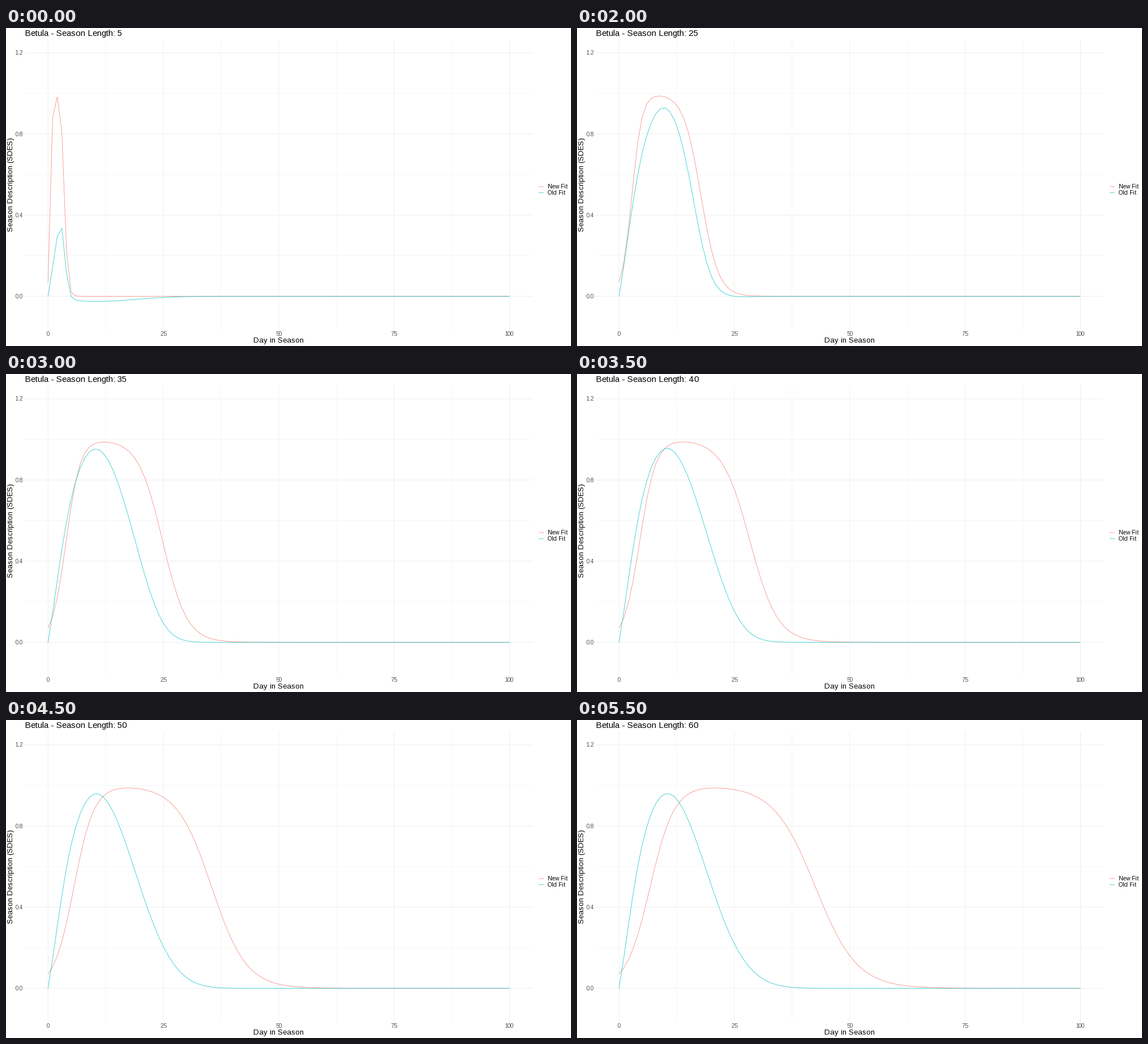
A matplotlib script that plays this animation: 998x561 px, repeating every 6000 ms.

```python
import matplotlib.pyplot as plt
import numpy as np
from matplotlib.animation import FuncAnimation

WIDTH, HEIGHT, DPI = 998, 561, 64
LEFT, RIGHT, TOP, BOTTOM = 33.2, 930.0, 20.4, 532.2
RED, TEAL = "#F8766D", "#00BFC4"
LINE = dict(alpha=0.8, solid_capstyle="butt", solid_joinstyle="round")
LINE_WIDTH = 0.85
DAYS = np.arange(101)

# Whole-pixel glyph advances
plt.rcParams.update({
    "font.family": "Liberation Sans",
    "text.hinting": "force_autohint",
    "text.hinting_factor": 1,
})


def pt(px):
    return px * 72 / DPI


def px_x(day):
    return 74.2 + 8.152 * day


def px_y(value):
    return 473.3 - 357.9 * value


def logistic(z):
    return 1 / (1 + np.exp(-z))


def new_fit(length):
    u = DAYS / length
    return logistic(23 * (u - 0.1125)) * logistic(13.3 * (0.709 - u))


def old_fit(length):
    season = 0.97 * np.tanh(0.27 * DAYS) * np.exp(-(DAYS - 10.25) ** 2 / 150.5)
    end = logistic(11.7 * (0.689 - DAYS / length))
    floor = logistic(11.7 * (0.689 - 1))
    return season * (end - floor) / (1 - floor)


fig = plt.figure(figsize=(WIDTH / DPI, HEIGHT / DPI), dpi=DPI, facecolor="white")
ax = fig.add_axes([0, 0, 1, 1])
ax.set_xlim(0, WIDTH)
ax.set_ylim(HEIGHT, 0)
ax.axis("off")


def stroke(xs, ys, color, width, **style):
    return ax.plot(xs, ys, color=color, lw=pt(width), snap=False, **style)[0]


def label(x, y, text, size, color="black", **style):
    return ax.text(x, y, text, fontsize=pt(size), color=color, va="baseline", **style)


def grid(days, values, width):
    for day in days:
        stroke([px_x(day)] * 2, [TOP, BOTTOM], "#EBEBEB", width)
    for value in values:
        stroke([LEFT, RIGHT], [px_y(value)] * 2, "#EBEBEB", width)


grid((12.5, 37.5, 62.5, 87.5), (0.2, 0.6, 1.0), 0.4)
grid((0, 25, 50, 75, 100), (0, 0.4, 0.8, 1.2), 0.8)

for day in (0, 25, 50, 75, 100):
    label(px_x(day), 543, str(day), 10, "#4D4D4D", ha="center")
for value in (0, 0.4, 0.8, 1.2):
    label(30.2, px_y(value) + 3.6, f"{value:.1f}", 10, "#4D4D4D", ha="right")

label(481.6, 555.5, "Day in Season", 12.5, ha="center")
label(12.2, 276.4, "Season Description (SDES)", 12.5, ha="center",
      rotation=90, rotation_mode="anchor")

for y, name, color in ((279.9, "New Fit", RED), (290.7, "Old Fit", TEAL)):
    stroke([941, 950], [y, y], color, LINE_WIDTH, **LINE)
    label(956.6, y + 3.4, name, 10)

title = label(LEFT, 14, "", 15)
new_line = stroke([], [], RED, LINE_WIDTH, **LINE)
old_line = stroke([], [], TEAL, LINE_WIDTH, **LINE)


def update(frame):
    length = 5 * (frame + 1)
    title.set_text(f"Betula - Season Length: {length}")
    new_line.set_data(px_x(DAYS), px_y(new_fit(length)))
    old_line.set_data(px_x(DAYS), px_y(old_fit(length)))
    return title, new_line, old_line


anim = FuncAnimation(fig, update, frames=12, interval=500, repeat=True, repeat_delay=0)
plt.show()
```
